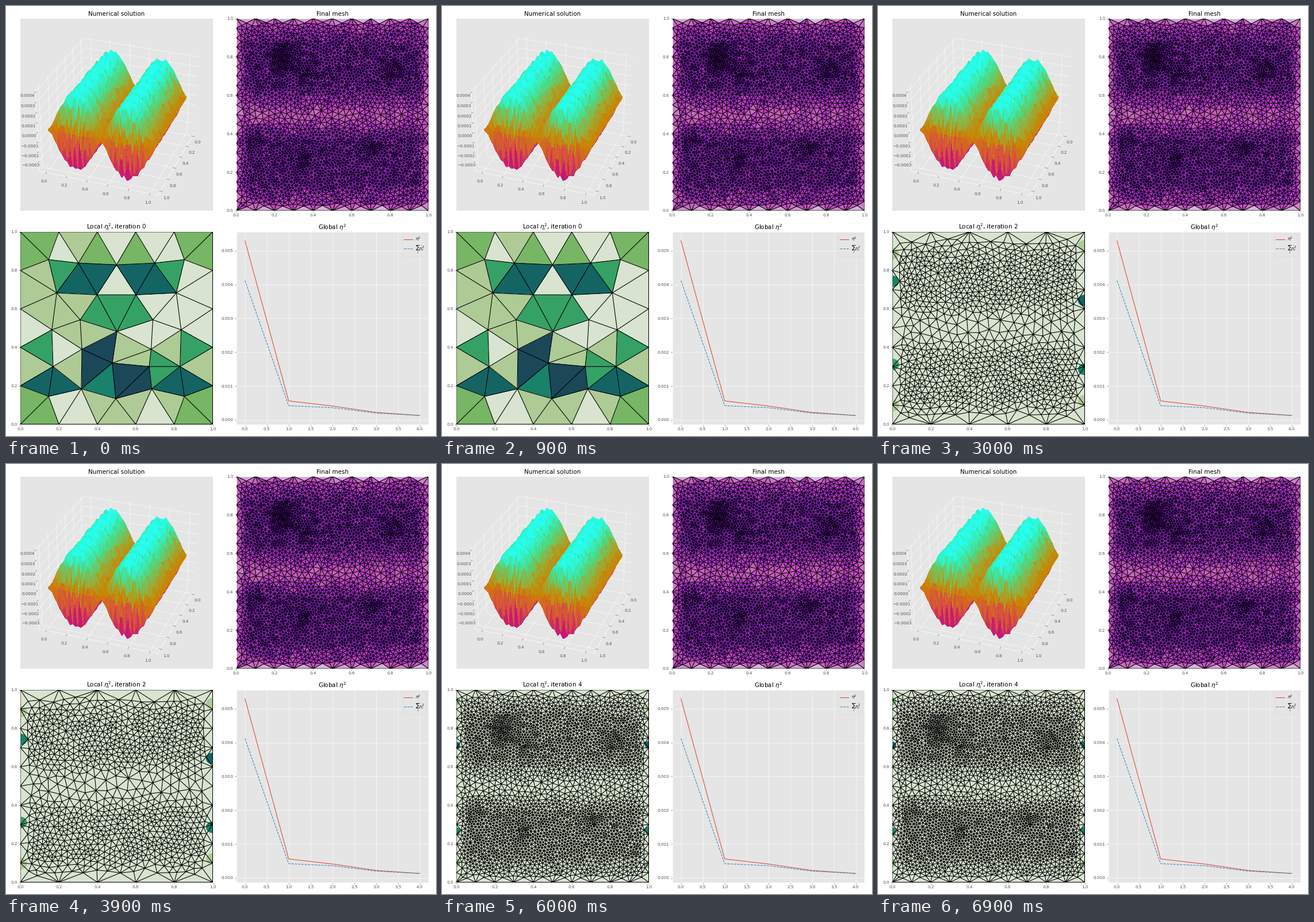
Animation, 748 px wide and 748 px high, one loop 7.5 s. Source, as a matplotlib script:

```python
import numpy as np
import matplotlib.pyplot as plt
from matplotlib.animation import FuncAnimation
from matplotlib.colors import LinearSegmentedColormap, ListedColormap
from matplotlib.patches import Ellipse
from matplotlib.tri import Triangulation

plt.style.use("ggplot")
SIZE, DPI, SIDE = 748, 52, 334.5
WAVES, PEAK = 8, 3.8e-4
rng = np.random.default_rng(7)

GREENS = ["#d8e4cf", "#aecb96", "#77b665", "#36a165", "#18836a", "#146464", "#1b4858"]
VIOLETS = LinearSegmentedColormap.from_list(
    "violets", ["#7a10cc", "#9a22d8", "#b434cc", "#c654bc", "#cc8cc8", "#dce6f5"])
RELIEF = LinearSegmentedColormap.from_list(
    "relief", ["#a8009c", "#c81c70", "#d85040", "#cc8200", "#a0a830", "#48dc88", "#24fff0"])

# Left half of the first mesh; the right half mirrors it
HALF = [(.147, .856), (.302, .838), (.189, .683), (.399, .673), (.311, .543), (.164, .491),
        (.32, .39), (.17, .3), (.317, .184), (.147, .145)]
MIDDLE = [(.5, .829), (.502, .482), (.478, .318), (.67, .3), (.496, .133)]

# Where the first error is large: x, y, level
PEAKS = [(.4, .34, 6), (.55, .21, 6), (.43, .21, 4), (.67, .265, 3)]
PAIRED = [(.35, .755, 5), (.157, .213, 5), (.42, .585, 3), (.21, .79, 3), (.1, .395, 3),
          (.08, .92, 2), (.08, .08, 2), (.4, .89, 2)]


def mirror(rows):
    return rows + [(1 - x, *rest) for x, *rest in rows]


def border(nx, ny):
    u, v = np.arange(nx) / nx, np.arange(ny) / ny
    return np.r_[u, 1 + 1j * v, 1 - u + 1j, 1j * (1 - v)]


def first_mesh():
    edge = border(5, 5)
    return Triangulation(*np.vstack([np.c_[edge.real, edge.imag],
                                     mirror(HALF) + MIDDLE]).T)


def first_levels(tri):
    """Each cell takes the level of a close peak, else a faint random one."""
    cx, cy = tri.x[tri.triangles].mean(1), tri.y[tri.triangles].mean(1)
    px, py, level = np.array(PEAKS + mirror(PAIRED)).T
    dist = np.hypot(cx[:, None] - px, cy[:, None] - py)
    faint = rng.integers(0, 2, len(cx))
    return np.where(dist.min(1) < .09, level[dist.argmin(1)], faint).astype(int)


def grow_mesh(spacing, nx, ny, tries):
    """Scatter points at a local spacing, then relax the interior ones."""
    edge = border(nx, ny)
    x, y = rng.random((2, tries))
    h = spacing(x, y)
    inside = np.minimum(np.minimum(x, 1 - x), np.minimum(y, 1 - y)) > .6 * h
    pts = np.empty(len(edge) + tries, complex)
    n = fixed = len(edge)
    pts[:n] = edge
    for p, r in zip((x + 1j * y)[inside], .8 * h[inside]):
        if np.abs(pts[:n] - p).min() > r:
            pts[n] = p
            n += 1
    pts = pts[:n]
    for _ in range(4):
        a, b = Triangulation(pts.real, pts.imag).edges.T
        total, count = np.zeros(n, complex), np.zeros(n)
        for i, j in ((a, b), (b, a)):
            np.add.at(total, i, pts[j])
            np.add.at(count, i, 1)
        pts[fixed:] += .6 * (total / count - pts)[fixed:]
    return Triangulation(pts.real, pts.imag)


def wave_spacing(coarse, fine, knots=0):
    """Fine in the two horizontal bands, with a few extra dense knots."""
    centres = rng.random((knots, 2)) * .8 + .1

    def spacing(x, y):
        band = np.clip(1.3 * np.abs(np.sin(2 * np.pi * y)), 0, 1)
        band *= np.clip(np.minimum(x, 1 - x) / .06, .4, 1)
        h = coarse + (fine - coarse) * band
        for cx, cy in centres:
            h *= 1 - .3 * np.exp(-((x - cx) ** 2 + (y - cy) ** 2) / .003)
        return h
    return spacing


coarse = first_mesh()
level = first_levels(coarse)
find = coarse.get_trifinder()
meshes = [
    coarse,
    grow_mesh(lambda x, y: .07 - .0075 * level[find(x, y)], 5, 10, 10000),
    grow_mesh(wave_spacing(.058, .025), 5, 10, 20000),
    grow_mesh(wave_spacing(.042, .0185), 5, 20, 35000),
    grow_mesh(wave_spacing(.03, .0147, 8), 10, 20, 50000),
]
final = meshes[-1]

fig = plt.figure(figsize=(SIZE / DPI, SIZE / DPI), dpi=DPI)


def panel(left, bottom, title, **kw):
    ax = fig.add_axes([left / SIZE, 1 - bottom / SIZE, SIDE / SIZE, SIDE / SIZE], **kw)
    ax.set_title(title)
    return ax


def mesh_panel(left, bottom, title):
    ax = panel(left, bottom, title)
    ax.grid(False)
    ax.axhline(0, color=GREENS[3], lw=1.5, zorder=4)
    return ax


def draw_mesh(ax, tri):
    lines = ax.triplot(tri, "k-", lw=1.5, zorder=3)
    ax.set(xlim=(0, 1), ylim=(0, 1))
    return lines


def edge_zones(ax, k):
    """Leftover error sits on the side walls, strongest beside the bands."""
    zones = []
    for side in (0, 1):
        for y, strength in ((.1, 1), (.28, 3), (.7, 4), (.9, 1)):
            shade = GREENS[strength + rng.integers(0, 2)]
            zones.append(ax.add_patch(Ellipse(
                (side, y + rng.normal(0, .02)), .1 - .015 * k, .08 - .01 * k,
                fc=shade, ec="none", zorder=2)))
    return zones


# Numerical solution
ax = panel(25, 356, "Numerical solution", projection="3d")
x, y = final.x, final.y
z = PEAK * np.sin(2 * np.pi * WAVES * x) * np.abs(np.sin(2 * np.pi * y))
ax.plot_trisurf(final, z, cmap=RELIEF, vmin=-.9 * PEAK, vmax=.9 * PEAK,
                linewidth=.2, antialiased=False)
half = .5 * 1.1 * 25 / 24
ax.set(xlim=(.5 - half, .5 + half), ylim=(.5 - half, .5 + half), zlim=(-3.98e-4, 4.3e-4))
ax.set_zticks(np.arange(-3, 5) * 1e-4)
ax.view_init(30, 20)
for axis in (ax.xaxis, ax.yaxis, ax.zaxis):
    axis.set_pane_color("#e5e5e5")

# Final mesh, coloured by cell area
ax = mesh_panel(400.5, 356, "Final mesh")
tx, ty = x[final.triangles], y[final.triangles]
area = .5 * np.abs((tx[:, 1] - tx[:, 0]) * (ty[:, 2] - ty[:, 0])
                   - (tx[:, 2] - tx[:, 0]) * (ty[:, 1] - ty[:, 0]))
ax.tripcolor(final, facecolors=np.log10(area + 1e-9), cmap=VIOLETS, vmin=-4.2, vmax=-2.7)
draw_mesh(ax, final)

# Global error
ax = panel(400.5, 727.5, r"Global $\eta^2$")
ax.plot([.0053, .00056, .00041, .00022, .00013], label=r"$\eta^2$")
ax.plot([.00412, .00042, .00036, .0002, .00013], "--", label=r"$\sum_i\eta_i^2$")
ax.legend(loc="upper right")

# Local error, one layer per iteration
local = mesh_panel(25, 727.5, "")
local.set_facecolor(GREENS[0])
layers = [draw_mesh(local, tri) for tri in meshes]
layers[0].append(local.tripcolor(coarse, facecolors=level, cmap=ListedColormap(GREENS),
                                 vmin=-.5, vmax=6.5))
for k, layer in enumerate(layers[1:], 1):
    layer += edge_zones(local, k)
local.set(xlim=(0, 1), ylim=(0, 1))


def show(k):
    for i, layer in enumerate(layers):
        for artist in layer:
            artist.set_visible(i == k)
    local.set_title(rf"Local $\eta_i^2$, iteration {k}")
    return []


anim = FuncAnimation(fig, show, frames=len(meshes), init_func=lambda: show(0),
                     interval=1500, repeat=True, repeat_delay=0, blit=False)
plt.show()
```
